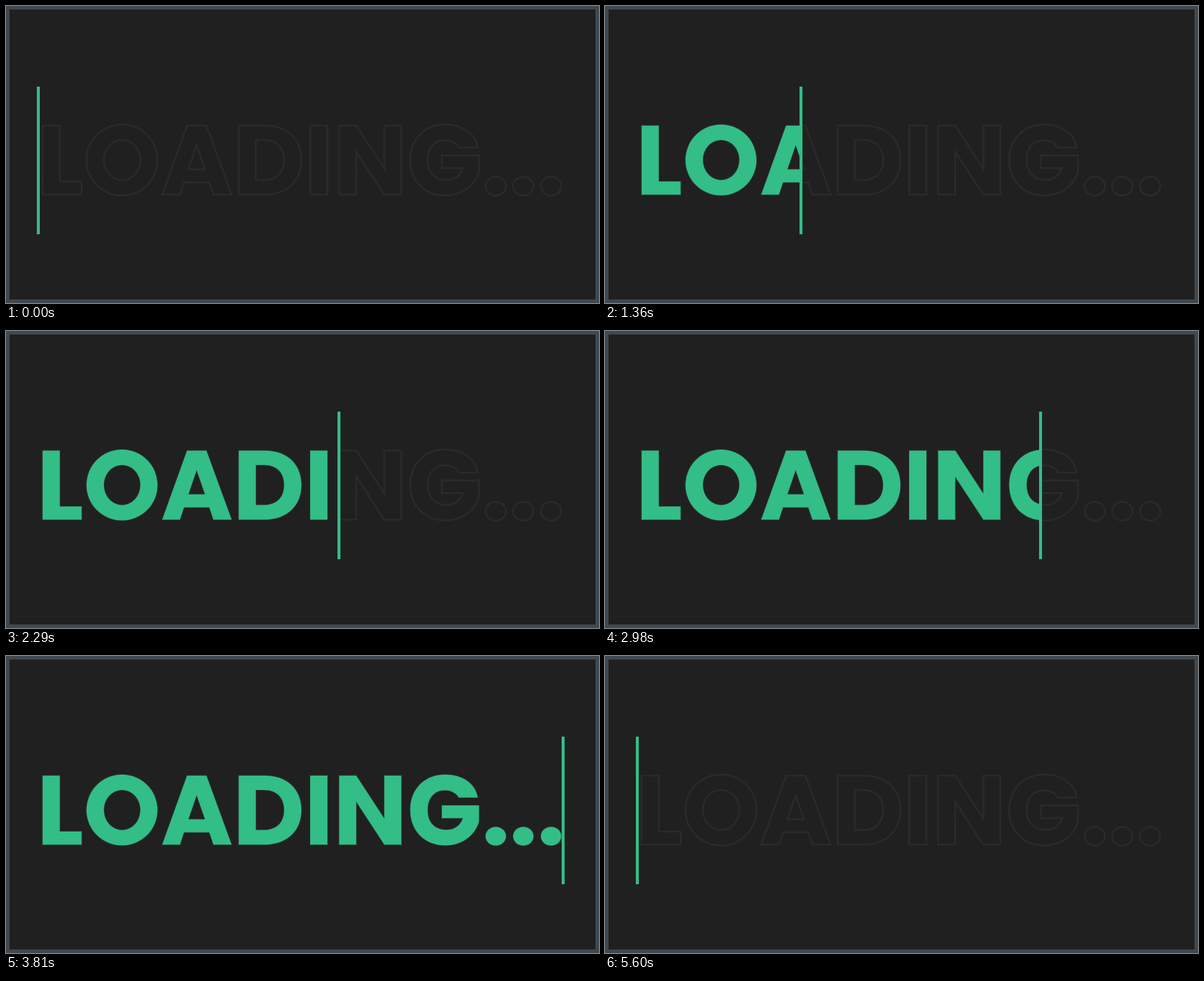
These frames come from a looping animation (1000 px wide and 501 px high, 5920 ms). An HTML page:

```html
<!DOCTYPE html>
<html lang="en">
<head>
<meta charset="utf-8">
<title>Loading</title>
<style>
  html, body { margin: 0; width: 100%; height: 100%; overflow: hidden; background: #3f4951; }
  .panel { position: absolute; left: 6px; top: 6px; width: 988px; height: 489px; background: #202020; }
  svg { position: absolute; width: 1000px; height: 501px; }
  .outline { left: 0; top: 0; fill: none; stroke: #2a2a2a; stroke-width: 3; }
  .reveal {
    position: absolute; left: 52px; top: 136px; height: 249px; width: 0; max-width: 885px;
    overflow: hidden; border-right: 5px solid #33bd87;
    animation: sweep 5920ms step-end -5ms infinite;
  }
  .reveal svg { left: -52px; top: -136px; fill: #33bd87; }

  /* slow stepped sweep out, hold, quick sweep back */
  @keyframes sweep {
    0%      { width: 0; }
    4.899%  { width: 6.6px;   animation-timing-function: steps(8); }
    15.203% { width: 160.5px; animation-timing-function: steps(6); }
    22.973% { width: 276px;   animation-timing-function: steps(2); }
    25.676% { width: 314.4px; animation-timing-function: steps(8); }
    36.149% { width: 468.4px; animation-timing-function: steps(2); }
    38.682% { width: 506.9px; animation-timing-function: steps(6); }
    46.453% { width: 622.3px; animation-timing-function: steps(3); }
    50.338% { width: 680px;   animation-timing-function: steps(5); }
    56.757% { width: 776.2px; animation-timing-function: steps(6); }
    64.358% { width: 891.6px; }
    84.291% { width: 854px;   animation-timing-function: steps(7); }
    93.412% { width: 62px; }
    94.595%, 100% { width: 0; }
  }
</style>
</head>
<body>
<div class="panel"></div>
<svg class="outline" viewBox="0 0 1000 501" role="img" aria-label="LOADING...">
  <defs>
    <ellipse id="dot" cy="304" rx="17.2" ry="15.8"/>
    <g id="word" fill-rule="evenodd">
      <path d="M61.7 201.8H90.7V296H127.5V318.2H61.7Z"/>
      <path d="M135.7 259.8a59.9 59.8 0 1 1 119.8 0a59.9 59.8 0 1 1 -119.8 0Z
               M165 259.8a30.8 33.9 0 1 0 61.6 0a30.8 33.9 0 1 0 -61.6 0Z"/>
      <path d="M305.3 201.8H338L380.5 318.2H349.8L342.8 297.6H300.2L293.4 318.2H263.4Z
               M321.5 234.8L307.6 275.6H335.6Z"/>
      <path d="M392.5 201.8H436C474.5 201.8 498.2 225 498.2 259.8C498.2 294.4 474.5 318.2 436 318.2H392.5Z
               M421.3 226V293.6H434.5C456 293.6 469 281.4 469 259.8C469 238.2 456 226 434.5 226Z"/>
      <path d="M513 201.8H542V318.2H513Z"/>
      <path d="M561.8 318.2V201.8H590.6L638 274.3V201.8H666.7V318.2H638L590.6 245.8V318.2Z"/>
      <path d="M795.5 238.8H763.5C759 231 750.5 226.5 740 226.5C722.5 226.5 711 239.5 711 259.8
               C711 281 723 293.3 743 293.3C756.5 293.3 766.5 286 770.5 273.5H735V252H797.6V279
               C792 300 772 319.5 741 319.5C706 319.5 681.7 295 681.7 259.7
               C681.7 224.5 706 200 740.5 200C771 200 792 216 795.5 238.8Z"/>
      <use href="#dot" x="825.9"/>
      <use href="#dot" x="872.4"/>
      <use href="#dot" x="919.2"/>
    </g>
  </defs>
  <use href="#word"/>
</svg>
<div class="reveal" aria-hidden="true">
  <svg viewBox="0 0 1000 501"><use href="#word"/></svg>
</div>
</body>
</html>
```
